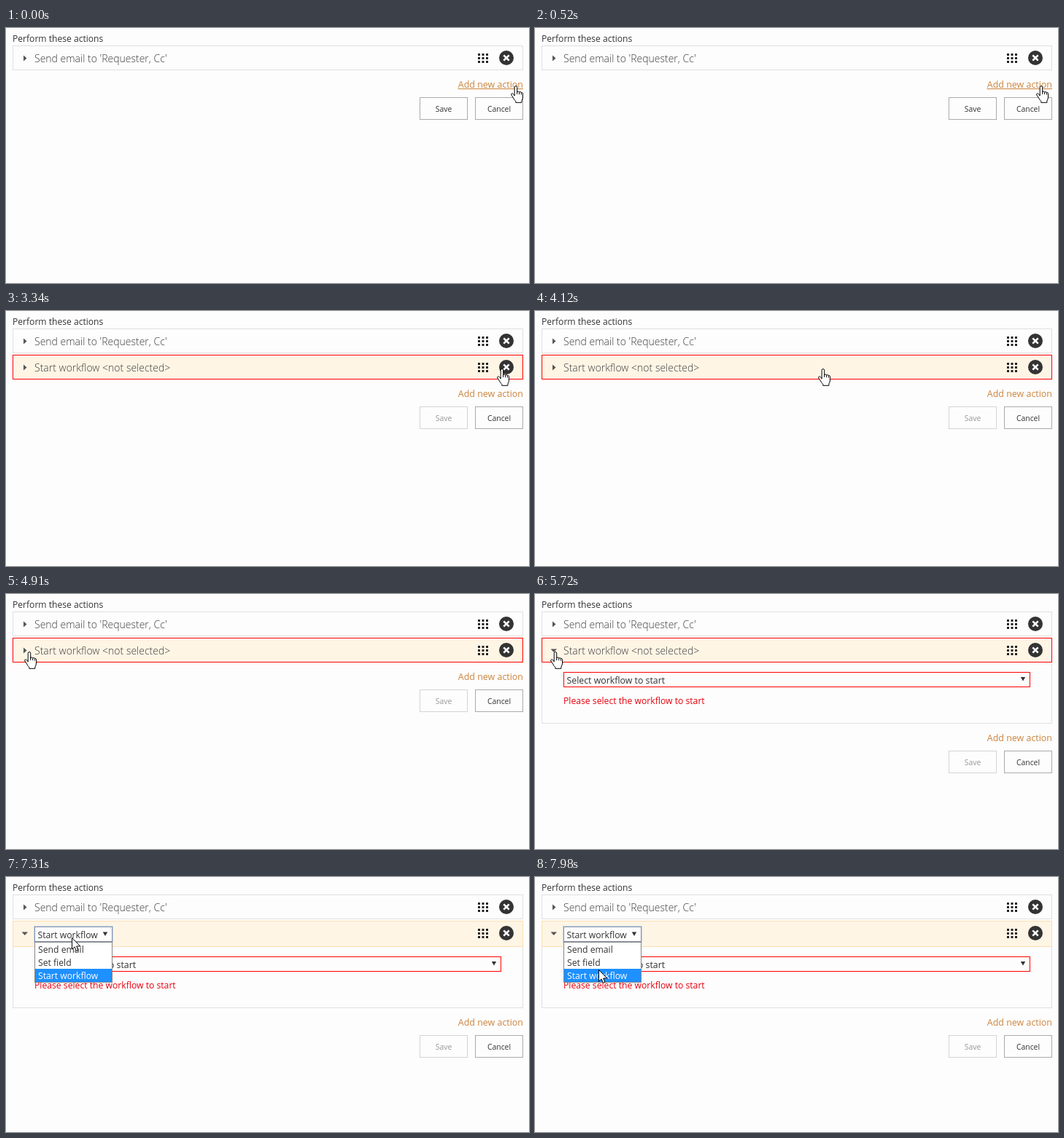
An HTML page that plays this animation: 717x350 px, repeating every 8000 ms.

```html
<!DOCTYPE html>
<html lang="en">
<head>
<meta charset="utf-8">
<title>Action list</title>
<style>
html, body { margin: 0; width: 100%; height: 100%; overflow: hidden; background: #fdfdfd; }
svg { display: block; width: 717px; height: 350px; font: 12.2px "Open Sans", "Noto Sans", sans-serif; fill: #333; }
.title { font-size: 14px; font-weight: 300; fill: #3c3c3c; }
.box { fill: #fdfdfd; stroke: #e0e0e0; }
.error { stroke: #f00; }
.button { fill: #fdfdfd; stroke: #ababab; }
.caption { font-size: 10.4px; text-anchor: middle; }
.link { font-size: 12.45px; fill: #cb843d; text-anchor: end; }
.glyph { fill: #fff; stroke: #000; stroke-linejoin: round; }

/* Every change is a hard step on one 8 s clock. */
.a { animation: 8s step-end infinite; }
.row { animation-name: row; }
.hover { animation-name: hover; }
.save { animation-name: save; }
.footer { animation-name: footer; }
.closed { animation-name: closed; }
.open { animation-name: open; }
.clip { animation-name: grow; }
.shift { animation-name: shift; }
.view { animation-name: view; }
.edit { animation-name: edit; }
.focus { animation-name: focus; }
.list { animation-name: list; }
.mark { animation-name: mark; }
.pointer { animation-name: pointer; }
.ring { animation-name: ring; }
.hand { animation-name: hand; }
.move { animation-name: move; }
.arrow { animation-name: edit-arrow; }

@keyframes row { 0% { opacity: 0 } 33.625%, 100% { opacity: 1 } }
@keyframes hover { 0% { opacity: 1 } 33.625%, 100% { opacity: 0 } }
@keyframes save { 0% { opacity: 1 } 33.625%, 100% { opacity: .5 } }
@keyframes footer {
  0% { transform: translateY(0) }
  33.625% { transform: translateY(36px) }
  69.625% { transform: translateY(90px) }
  71.5% { transform: translateY(120px) }
  73%, 100% { transform: translateY(122px) }
}
@keyframes closed { 0% { opacity: 1 } 69.625%, 100% { opacity: 0 } }
@keyframes open { 0% { opacity: 0 } 69.625%, 100% { opacity: 1 } }
@keyframes grow { 0% { height: 54px } 71.5%, 100% { height: 84px } }
@keyframes shift { 0% { transform: translateY(0) } 73%, 100% { transform: translateY(2px) } }
@keyframes view { 0% { opacity: 1 } 73%, 100% { opacity: 0 } }
@keyframes edit { 0% { opacity: 0 } 73%, 100% { opacity: 1 } }
@keyframes focus { 0% { opacity: 0 } 82.875%, 100% { opacity: 1 } }
@keyframes list { 0% { opacity: 0 } 84.5%, 100% { opacity: 1 } }
@keyframes mark {
  0% { transform: translateY(36px) }
  92.875% { transform: translateY(0) }
  94.5% { transform: translateY(18px) }
  98.25%, 100% { transform: translateY(36px) }
}
@keyframes ring {
  0% { opacity: 0 } 30.25% { opacity: 1 } 31.75% { opacity: 0 }
  64.75% { opacity: 1 } 68.125% { opacity: 0 }
  82.875% { opacity: 1 } 84.5%, 100% { opacity: 0 }
}
@keyframes hand {
  0% { opacity: 1 } 43.25% { opacity: 0 } 45.125% { opacity: 1 } 79.5%, 100% { opacity: 0 }
}
@keyframes move { 0% { opacity: 0 } 43.25% { opacity: 1 } 45.125%, 100% { opacity: 0 } }
@keyframes edit-arrow { 0% { opacity: 0 } 79.5%, 100% { opacity: 1 } }
@keyframes pointer {
  0% { transform: translate(699px, 79px) }
  1.5% { transform: translate(696px, 79px) }
  6.5% { transform: translate(694px, 79px) }
  41.75% { transform: translate(680px, 79px) }
  43.25% { transform: translate(645.5px, 79px) }
  45.125% { transform: translate(632px, 79px) }
  46.625% { transform: translate(608px, 79px) }
  48.125% { transform: translate(570px, 79px) }
  49.625% { transform: translate(507px, 79px) }
  51.5% { transform: translate(395px, 79px) }
  53% { transform: translate(290px, 79px) }
  54.5% { transform: translate(192px, 79px) }
  56% { transform: translate(116px, 79px) }
  58% { transform: translate(62px, 79px) }
  59.875% { transform: translate(42px, 79px) }
  61.375% { transform: translate(32px, 79px) }
  62.875% { transform: translate(28px, 79px) }
  78% { transform: translate(40px, 79px) }
  79.5% { transform: translate(72px, 79px) }
  81% { transform: translate(90px, 79px) }
  91.375% { transform: translate(90px, 83px) }
  92.875% { transform: translate(89px, 100px) }
  94.5% { transform: translate(88px, 117px) }
  96.375% { transform: translate(88px, 124px) }
  98.25% { transform: translate(87px, 126px) }
  99.75%, 100% { transform: translate(87px, 127px) }
}
</style>
</head>
<body>
<svg viewBox="0 0 717 350">
  <defs>
    <g id="icons">
      <path d="M647 36.5h14M647 41.5h14M647 46.5h14" fill="none" stroke="#222" stroke-width="3" stroke-dasharray="3 2.5"/>
      <circle cx="686" cy="41" r="10" fill="#333"/>
      <path d="M682.3 37.3l7.4 7.4M689.7 37.3l-7.4 7.4" stroke="#fff" stroke-width="2.6"/>
    </g>
    <path id="right" d="M24 37.5v8l4.5-4z" fill="#555"/>
    <path id="drop" d="M-3.2-2.5h6.4L0 3z"/>
    <g id="options">
      <text x="44" y="104">Send email</text>
      <text x="44" y="122">Set field</text>
      <text x="44" y="140">Start workflow</text>
    </g>
    <clipPath id="panel"><rect class="a clip" x="9" y="94" width="700" height="84"/></clipPath>
    <clipPath id="marked"><rect class="a mark" x="40" y="90" width="105" height="18"/></clipPath>
  </defs>

  <text x="9" y="19" font-size="12.1">Perform these actions</text>
  <rect class="box" x="9.5" y="24.5" width="699" height="33"/>
  <use href="#right"/>
  <text class="title" x="39" y="47">Send email to 'Requester, Cc'</text>
  <use href="#icons"/>

  <g class="a footer">
    <text class="link" x="709" y="82">Add new action</text>
    <path class="a hover" d="M619.5 83.5h89.5" stroke="#cb843d"/>
    <g class="a save">
      <rect class="button" x="567.5" y="95.5" width="65" height="30"/>
      <text class="caption" x="600" y="115">Save</text>
    </g>
    <rect class="button" x="643.5" y="95.5" width="65" height="30"/>
    <text class="caption" x="676" y="115">Cancel</text>
  </g>

  <g class="a open">
    <g class="a shift">
      <rect class="box a clip" x="9.5" y="93.5" width="699" height="84"/>
      <g clip-path="url(#panel)">
        <rect class="box error" x="39.5" y="107.5" width="639" height="20"/>
        <text x="43.5" y="123" font-size="12.35">Select workflow to start</text>
        <use href="#drop" x="669" y="116.5"/>
        <text x="39" y="151" fill="#e8000d">Please select the workflow to start</text>
      </g>
    </g>
  </g>

  <g class="a row">
    <g class="a view">
      <rect class="error" x="9.5" y="60.5" width="699" height="33" fill="#fef5e5"/>
      <text class="title" x="39" y="83">Start workflow &lt;not selected&gt;</text>
    </g>
    <g class="a edit">
      <rect x="9.5" y="60.5" width="699" height="35" fill="#fef5e5" stroke="#f9e0b2"/>
      <rect class="a focus" x="38.5" y="67.5" width="108" height="22" fill="none" stroke="#c3d3ea"/>
      <rect x="39.5" y="68.5" width="106" height="20" fill="#fdfdfd" stroke="#8795a8"/>
      <text x="43.5" y="84">Start workflow</text>
      <use href="#drop" x="136" y="78"/>
    </g>
    <use class="a closed" href="#right" y="36"/>
    <g class="a open"><path class="a edit-shift" d="M21.5 75.5h8.5l-4.2 4.5z" fill="#555"/></g>
    <use href="#icons" y="36"/>
  </g>

  <g class="a list">
    <rect x="39.5" y="89.5" width="106" height="55" fill="#fff" stroke="#858585"/>
    <use href="#options"/>
    <rect class="a mark" x="40" y="90" width="105" height="18" fill="#1e90ff"/>
    <g clip-path="url(#marked)" fill="#fff"><use href="#options"/></g>
  </g>

  <g class="a pointer">
    <circle class="a ring" cy="1" r="9.8" fill="#fff" fill-opacity=".3" stroke="#000"/>
    <g class="a hand">
      <g class="glyph" transform="translate(-7)">
        <path d="M5.2 14V2.3a1.75 1.75 0 0 1 3.5 0V9q.2-1 1.5-1 1.3 0 1.6 1.4.3-.8 1.3-.8 1.3 0 1.5 1.5.4-.7 1.1-.5.8.2.8 1.6V16q0 2-1.2 4.2l-.4.8v2.3H6.8v-1.8q-2-1.8-3.3-4.5L.9 13q-.7-1.5.5-2.1 1.2-.5 2.2.8z"/>
        <path d="M8.7 8.5v3.5M11.7 9.4v2.8M14.5 10.3v2.2" fill="none"/>
      </g>
    </g>
    <path class="a move glyph" d="M0-11l4 4H1.5v5.5H7V-4l4 4-4 4V1.5H1.5V7H4l-4 4-4-4h2.5V1.5H-7V4l-4-4 4-4v2.5h5.5V-7H-4z"/>
    <path class="a arrow glyph" d="M.5.5v15.8l3.6-3.4 2.3 5.5 2.6-1-2.3-5.4h5z"/>
  </g>
</svg>
</body>
</html>
```
